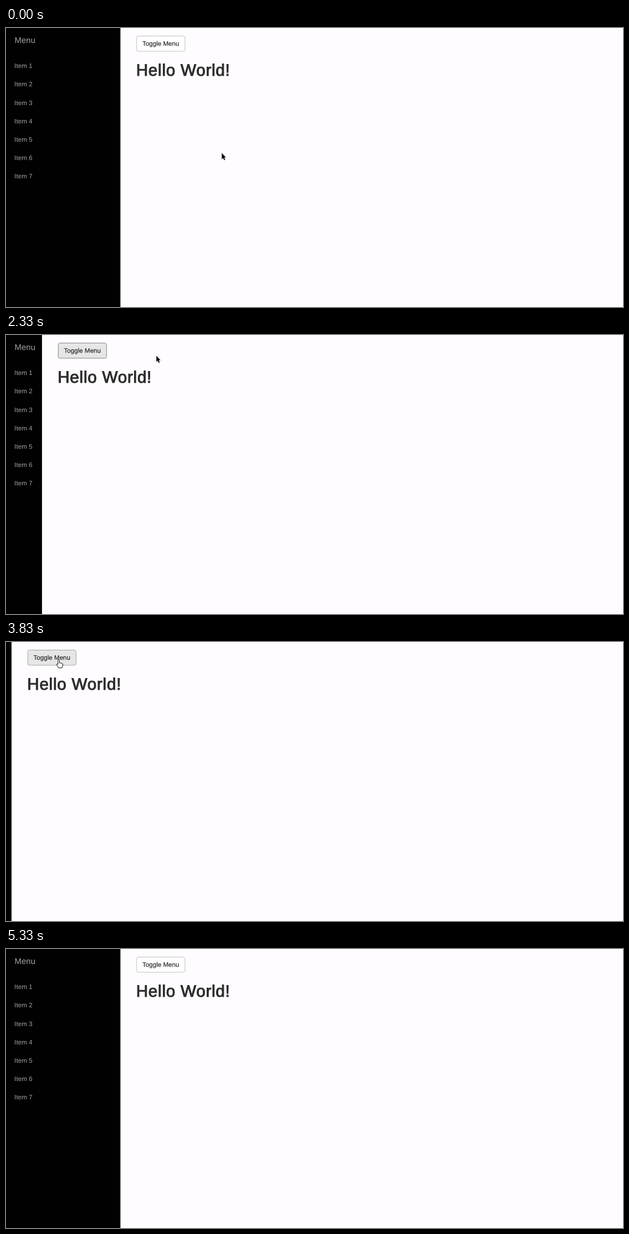
These frames come from a looping animation (1113x503 px, 5990 ms). An HTML page:

```html
<!DOCTYPE html>
<html lang="en">
<head>
<meta charset="utf-8">
<title>Sidebar toggle</title>
<style>
  html, body { margin: 0; width: 100%; height: 100%; overflow: hidden; background: #fffcff; }
  svg { display: block; font-family: "Liberation Sans", Arial, sans-serif; text-rendering: geometricPrecision; }
  .menu { fill: #a4a4a4; font-size: 11.53px; letter-spacing: .1px; }
  .brand { font-size: 14.82px; letter-spacing: .2px; }
  .label { fill: #222; stroke: #222; stroke-width: .15px; font-size: 11.53px; letter-spacing: .05px; }
  .title { fill: #2d2d2d; stroke: #2d2d2d; stroke-width: 1.1px; font-size: 29.65px; letter-spacing: .75px; }
  #button { fill: #fff; stroke: #c0c0c0; stroke-width: 1px; }
  #button.hover { fill: #e6e6e6; stroke: #a6a6a6; }
  #button.press { fill: #d4d4d4; stroke: #848484; }
  #button.focus { fill: #e6e6e6; stroke: #848484; }
  #cursor { filter: drop-shadow(0 .8px .7px rgba(0, 0, 0, .3)); }
</style>
</head>
<body>
<svg width="1113" height="503" viewBox="0 0 1113 503">
  <rect width="1113" height="503" fill="#010101"/>
  <g class="menu" id="menu">
    <text class="brand" x="15.4" y="27.3">Menu</text>
  </g>
  <g id="page">
    <rect width="1330" height="503" fill="#fffcff"/>
    <rect id="button" x="29.3" y="14.5" width="87.2" height="27.4" rx="3.2"/>
    <text class="label" x="39.6" y="32.3">Toggle Menu</text>
    <text class="title" x="28.3" y="86">Hello World!</text>
  </g>
  <g id="cursor">
    <path id="arrow" d="M.3 .6V11.4L2.7 9.2L4.5 13.3L6.2 12.5L4.5 8.5H7.6Z"
      stroke="#fff" stroke-width="1.4" paint-order="stroke"/>
    <path id="hand" fill="#fff" stroke="#000" stroke-width=".9" stroke-linejoin="round"
      d="M-1.3 8.5V1.4a1.3 1.3 0 0 1 2.6 0V6q1.3-1 2.3.3q1.3-.7 2.1.5q1.5-.5 1.8 1V10q-.1 1.5-1.2 3.2V14.7H0Q-1 12.5-3.4 9.6q-1-1.6.2-1.9Q-2.3 7.5-1.3 8.5z"/>
  </g>
</svg>
<script>
  const LOOP = 5990, FPS = 6, OPEN = 206.4, CLOSED = -.6;
  const $ = id => document.getElementById(id);

  for (let i = 0; i < 7; i++) {
    const item = document.createElementNS("http://www.w3.org/2000/svg", "text");
    item.setAttribute("x", 15.1);
    item.setAttribute("y", 72.2 + 33.15 * i);
    item.textContent = "Item " + (i + 1);
    $("menu").append(item);
  }

  // Tracks hold their value from the given tick (1/6 s) on.
  const pointer = [
    [0, "arrow", 389, 225], [2, "arrow", 306, 132], [4, "arrow", 287, 86],
    [5, "arrow", 277, 60], [6, "arrow", 274, 49], [7, "arrow", 272, 43],
    [8, "arrow", 271, 37], [9, "hand", 271, 37], [10, "hand", 271, 36.5],
    [14, "arrow", 271, 37], [17, "arrow", 225, 42], [18, "arrow", 140, 37],
    [19, "hand", 100, 33], [20, "hand", 97, 32], [21, "hand", 95, 32],
    [24, "arrow", 240, 130], [25, "arrow", 413, 255], [26, "arrow", 521, 385],
    [27, "arrow", 543, 411], [28, "arrow", 332, 75], [29, "none", 0, 0]
  ];
  const button = [
    [0, ""], [9, "hover"], [14, "focus"], [19, "hover"],
    [22, "press"], [23, "hover"], [24, "focus"], [32, ""]
  ];
  const at = (track, tick) => track.findLast(key => key[0] <= tick);

  // CSS "ease": cubic-bezier(.25, .1, .25, 1)
  function ease(x) {
    if (x <= 0 || x >= 1) return x <= 0 ? 0 : 1;
    const curve = (a, b, u) => 3 * a * u * (1 - u) ** 2 + 3 * b * u * u * (1 - u) + u ** 3;
    let lo = 0, hi = 1;
    for (let i = 0; i < 24; i++) {
      const mid = (lo + hi) / 2;
      if (curve(.25, .25, mid) < x) lo = mid; else hi = mid;
    }
    return curve(.1, 1, lo);
  }

  function menuWidth(ms) {
    const hidden = ease((ms - 2133) / 500) - ease((ms - 3796) / 555);
    return OPEN + (CLOSED - OPEN) * hidden;
  }

  function draw() {
    // The small lead absorbs the rounding of frame times to 10 ms.
    const tick = Math.floor((performance.now() % LOOP + 4) * FPS / 1000);
    const [, shape, x, y] = at(pointer, tick);
    $("page").setAttribute("transform", `translate(${menuWidth(tick * 1000 / FPS)})`);
    $("button").setAttribute("class", at(button, tick)[1]);
    $("cursor").setAttribute("transform", `translate(${x} ${y})`);
    for (const id of ["arrow", "hand"]) $(id).style.display = id === shape ? "" : "none";
    requestAnimationFrame(draw);
  }
  draw();
</script>
</body>
</html>
```
